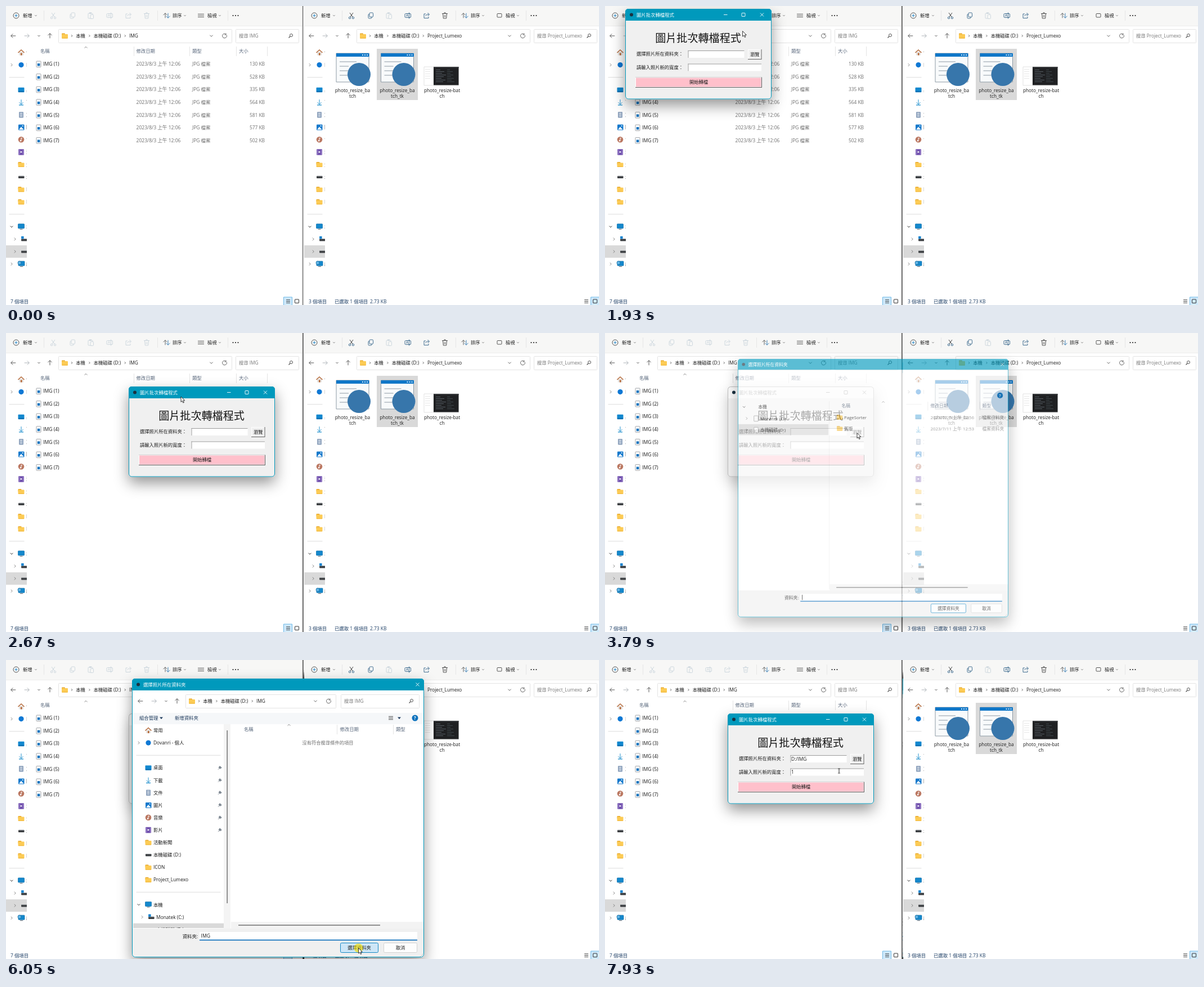
Recreate the animation shown at these times as an HTML page with a canvas. Size 1054 by 531 pixels, loop 8000 ms.

```html
<!DOCTYPE html>
<html lang="zh-Hant">
<head>
<meta charset="utf-8">
<title>Batch resize demo</title>
<style>
html, body { margin: 0; width: 100%; height: 100%; overflow: hidden; background: #fff; }
canvas { display: block; width: 100vw; height: 100vh; }
</style>
</head>
<body>
<canvas id="stage"></canvas>
<script>
const W = 1054, H = 531, LOOP = 8000, TICK = 1000 / 15;
const K = Math.max(1, window.devicePixelRatio || 1);
const FONT = '"Open Sans","Noto Sans CJK TC","Noto Sans CJK JP","Noto Sans",sans-serif';
const TEAL = '#0099bc', BLUE = '#0a79c4', INK = '#1c1c1c', GREY = '#6f6f6f', HEAD = '#56657a';
const SIDE = [
  ['home', '常用'], ['cloud', 'Dovanri - 個人', 'r'], 0,
  ['desk', '桌面'], ['down', '下載'], ['doc', '文件'], ['pic', '圖片'], ['music', '音樂'], ['video', '影片'],
  ['folder', '活動新聞'], ['drive', '本機磁碟 (D:)'], ['folder', 'ICON'], ['folder', 'Project_Lumexo'], 0,
  ['pc', '本機', 'd'], ['sys', 'Monatek (C:)', 'r', 6], ['drive', '本機磁碟 (D:)', 'r', 6], ['net', '網路', 'r']
];
const SIZES = [130, 528, 335, 564, 581, 577, 502];

function surface(el) {
  el.width = Math.round(W * K);
  el.height = Math.round(H * K);
  return el.getContext('2d');
}
const main = surface(document.getElementById('stage'));
const spare = surface(document.createElement('canvas'));
let c = main;

const clamp = (v, a = 0, b = 1) => Math.min(b, Math.max(a, v));
const smooth = p => p * p * (3 - 2 * p);

function text(s, x, y, color = INK, size = 8.4, align = 'left', weight = 400) {
  c.font = `${weight} ${size}px ${FONT}`;
  c.textAlign = align;
  c.fillStyle = color;
  c.fillText(s, x, y + size * .37);
  return c.measureText(s).width;
}
function rect(x, y, w, h, color) {
  c.fillStyle = color;
  c.fillRect(x, y, w, h);
}
function box(x, y, w, h, fill, stroke, r = 2, lw = 1) {
  c.beginPath();
  c.roundRect(x, y, w, h, r);
  if (fill) { c.fillStyle = fill; c.fill(); }
  if (stroke) { c.strokeStyle = stroke; c.lineWidth = lw; c.stroke(); }
}
function line(pts, color = '#333', lw = .9) {
  c.beginPath();
  for (let i = 0; i < pts.length; i += 2) c.lineTo(pts[i], pts[i + 1]);
  c.strokeStyle = color;
  c.lineWidth = lw;
  c.stroke();
}
function shape(pts, color) {
  c.beginPath();
  for (let i = 0; i < pts.length; i += 2) c.lineTo(pts[i], pts[i + 1]);
  c.fillStyle = color;
  c.fill();
}
function disc(x, y, r, fill, stroke, lw = .9) {
  c.beginPath();
  c.arc(x, y, r, 0, 7);
  if (fill) { c.fillStyle = fill; c.fill(); }
  if (stroke) { c.strokeStyle = stroke; c.lineWidth = lw; c.stroke(); }
}
function chevron(x, y, dir, color = '#555', s = 2) {
  if (dir === 'r') line([x - s / 2, y - s, x + s / 2, y, x - s / 2, y + s], color);
  else {
    const k = dir === 'd' ? 1 : -1;
    line([x - s, y - k * s / 2, x, y + k * s / 2, x + s, y - k * s / 2], color);
  }
}
function arrow(x, y, dx, dy, color) {
  const s = 4.3, a = x + dx * s, b = y + dy * s;
  line([x - dx * s, y - dy * s, a, b], color);
  line([a - dx * 3.5 + dy * 3.5, b - dy * 3.5 + dx * 3.5, a, b, a - dx * 3.5 - dy * 3.5, b - dy * 3.5 - dx * 3.5], color);
}
function bars(x, y, w, color = '#444') {
  for (let i = -1; i < 2; i++) line([x - w / 2, y + i * 2.7, x + w / 2, y + i * 2.7], color, .9);
}
function clipped(x, y, w, h, fn, r = 0) {
  c.save();
  c.beginPath();
  c.roundRect(x, y, w, h, r);
  c.clip();
  fn();
  c.restore();
}

const icons = {
  home(x, y) {
    rect(x - 4, y - 1, 8, 6, '#e4e0dc');
    rect(x - 1, y + 1, 2.4, 4, '#b3622f');
    line([x - 5.5, y + .5, x, y - 4.5, x + 5.5, y + .5], '#b56b3c', 1.5);
  },
  cloud(x, y) { disc(x, y, 4.6, '#0f78d4'); },
  desk(x, y) { box(x - 5.5, y - 4, 11, 8.5, '#1288cf', 0, 1); rect(x - 5, y + 2.5, 10, 1.5, '#0a66a8'); },
  down(x, y) { arrow(x, y - .5, 0, 1, '#0d86c9'); line([x - 4, y + 5, x + 4, y + 5], '#0d86c9', 1.2); },
  doc(x, y) {
    box(x - 4, y - 5, 8, 10.5, '#8fa3bd', 0, 1);
    for (const d of [-2.5, 0, 2.5]) line([x - 2.2, y + d, x + 2.2, y + d], '#eef3f9', 1);
  },
  pic(x, y) {
    box(x - 5, y - 4.5, 10.5, 10, '#1479cc', 0, 1);
    shape([x - 4, y + 4.5, x, y - .5, x + 4.5, y + 4.5], '#fff');
    disc(x + 2.6, y - 2, 1, '#fff');
  },
  music(x, y) {
    disc(x, y, 5.3, '#bb7862');
    line([x, y + 2, x, y - 3, x + 2, y - 2], '#fff', 1);
    disc(x - 1, y + 2, 1.2, '#fff');
  },
  video(x, y) {
    box(x - 5, y - 5, 10, 10.5, '#7050ad', 0, 1);
    line([x - 3.7, y - 4, x - 3.7, y + 5], '#c6b4e6', .8);
    line([x + 3.7, y - 4, x + 3.7, y + 5], '#c6b4e6', .8);
    shape([x - 1.3, y - 2, x + 2, y, x - 1.3, y + 2], '#fff');
  },
  folder(x, y) {
    box(x - 5.5, y - 4.5, 6, 5, '#e8a92c', 0, 1);
    box(x - 5.5, y - 3, 11, 7.7, '#fccb55', 0, 1);
    rect(x - 5, y + 3.5, 10, 1, '#f0b63a');
  },
  drive(x, y) { box(x - 5, y - 1.5, 10.5, 4, '#3c3f42', 0, .8); rect(x - 4.5, y - 2, 9.5, 1, '#a2a6a9'); },
  sys(x, y) { icons.drive(x, y + 1); rect(x - 5, y - 5, 4.5, 4.5, '#1583cf'); },
  pc(x, y) {
    box(x - 5.5, y - 5, 11, 8, '#1488cc', '#0a6ba8', .8, .7);
    rect(x - 2.5, y + 4, 5, 1, '#5a6570');
  },
  net(x, y) { icons.pc(x + .5, y); disc(x - 3, y - 2, 3, '#62b6e8', '#1b6c9f', .8); }
};

function sidebar(ox, oy, right, full) {
  SIDE.forEach((it, i) => {
    const y = oy + i * 22.1;
    if (!it) return rect(ox + 5.5, y - .5, full ? 150 : 27, 1, '#dcdcdc');
    const [kind, label, dir, indent = 0] = it;
    if (i === 16) rect(ox, y - 11, right - ox, 22, '#d9d9d9');
    if (dir) chevron(ox + 10 + indent, y, dir, dir === 'd' ? '#222' : '#777', 2.4);
    icons[kind](ox + 27 + indent * .85, y);
    text(label, ox + 36 + indent * .85, y);
    if (full && i > 2 && i < 9) {
      shape([ox + 154, y - 3.5, ox + 158, y + .5, ox + 156, y + 1, ox + 154.5, y + 2.5, ox + 151.5, y - .5, ox + 153, y - 2], '#7d8791');
      line([ox + 153, y + 1, ox + 151, y + 3.3], '#7d8791');
    }
  });
}

function address(ox, y, w, crumbs, find, gap, findW, canBack = true) {
  const soft = '#a5abb2', dark = '#444', bx = ox + 93;
  arrow(ox + 13, y, -1, 0, canBack ? dark : soft);
  arrow(ox + 37, y, 1, 0, soft);
  chevron(ox + 58.5, y, 'd', canBack ? '#444' : '#888');
  arrow(ox + 78, y, 0, -1, dark);
  box(bx + .5, y - 11.5, w - 1, 24, '#fff', '#e3e3e3', 1);
  icons.folder(ox + 104.5, y);
  let x = ox + 117;
  for (const s of crumbs) {
    chevron(x, y, 'r', '#555', 1.8);
    if (s) x += 7.3 + text(s, x + 7.3, y, INK, 8.3) + 7.5;
  }
  chevron(bx + w - 37, y, 'd', '#555', 2.6);
  c.beginPath();
  c.arc(bx + w - 13.5, y, 3.8, -.4, 5.2);
  c.strokeStyle = '#555';
  c.lineWidth = .9;
  c.stroke();
  line([bx + w - 11, y - 4.5, bx + w - 11, y - 2, bx + w - 13.5, y - 2], '#555');
  const fx = bx + w + gap;
  box(fx + .5, y - 11.5, findW - 1, 24, '#fff', '#e3e3e3', 1);
  text('搜尋 ' + find, fx + 6, y, '#777', 8.3);
  disc(fx + findW - 14, y - 1, 2.5, 0, '#444');
  line([fx + findW - 16, y + 1, fx + findW - 18.5, y + 3.5], '#444', 1.1);
}

function toolbar(ox, live) {
  const y = 17, on = live ? '#2d5f86' : '#c9d4dc', off = '#c9d4dc';
  rect(ox, 0, 528, 35, '#f7f7f6');
  rect(ox, 35, 528, 1, '#ececec');
  disc(ox + 18, y, 5, 0, '#444');
  line([ox + 15.5, y, ox + 20.5, y], BLUE);
  line([ox + 18, y - 2.5, ox + 18, y + 2.5], BLUE);
  text('新增', ox + 30, y);
  for (const [x, d] of [[53, 1], [318, 1], [380, 1]]) chevron(ox + x, y, 'd', '#777', 1.7);
  for (const x of [67, 269, 394]) rect(ox + x, 8, 1, 18, '#e6e6e6');
  const x = ox + 84;
  line([x - 3, y - 5, x + 2.5, y + 3], live ? '#333' : off);
  line([x + 3, y - 5, x - 2.5, y + 3], live ? '#333' : off);
  disc(x - 3, y + 4, 1.7, 0, on);
  disc(x + 3, y + 4, 1.7, 0, on);
  box(x + 30, y - 2.5, 6, 7.5, 0, on, 1.3, .9);
  box(x + 32, y - 5, 6.5, 7.5, '#f7f7f6', on, 1.3, .9);
  box(x + 62, y - 4, 8, 9, 0, off, 1, .9);
  box(x + 66, y - 1.5, 5.5, 7, '#f7f7f6', off, 1, .9);
  rect(x + 64, y - 5.5, 4, 2, off);
  box(x + 95, y - 3.5, 10.5, 7, 0, on, 1.5, .9);
  text('A', x + 97, y, on, 6.5);
  line([x + 102.5, y - 5.5, x + 102.5, y + 5.5], on);
  line([x + 132, y - 3, x + 129, y - 3, x + 129, y + 4.5, x + 137, y + 4.5, x + 137, y + 2], on);
  line([x + 131.5, y + 1, x + 134, y - 2, x + 138, y - 2], on);
  line([x + 135.5, y - 5, x + 138.5, y - 2, x + 135.5, y + 1], on);
  const bin = live ? '#444' : off;
  line([x + 161, y - 3.5, x + 171, y - 3.5], bin);
  line([x + 162.5, y - 3.5, x + 163.3, y + 5, x + 168.7, y + 5, x + 169.5, y - 3.5], bin);
  line([x + 164.5, y - 4, x + 165, y - 5.2, x + 167, y - 5.2, x + 167.5, y - 4], bin);
  line([x + 165, y - 1, x + 165, y + 3], bin, .7);
  line([x + 167, y - 1, x + 167, y + 3], bin, .7);
  arrow(ox + 283, y, 0, -1, '#555');
  arrow(ox + 288, y, 0, 1, '#2d77b0');
  text('排序', ox + 296, y);
  if (live) box(ox + 343, y - 3.5, 8, 6.5, 0, '#444', 1, .9);
  else bars(ox + 346.5, y, 11, '#555');
  text('檢視', ox + 358, y);
  for (let i = 0; i < 3; i++) disc(ox + 403.5 + i * 4.5, y, 1.1, '#222');
}

function pane(ox, place, live) {
  rect(ox, 0, 528, H, '#fff');
  toolbar(ox, live);
  address(ox, 53, 309, ['本機', '本機磁碟 (D:)', place], place, 6, 113);
  clipped(ox, 67, 37, 440, () => sidebar(ox, 82.5, ox + 37));
  text(live ? '3 個項目' : '7 個項目', ox + 8, 524.5, '#1e3f66');
  const pick = ox + (live ? 509.5 : 493.5);
  box(pick, 517, 15, 16, '#cfe9fb', '#6fb9e6', 0);
  bars(ox + 501.5, 524.5, 7, '#333');
  box(ox + 513.5, 521, 7, 6.5, 0, '#333', .5, 1);
}

function header(cols, seps, y, caretX, caretY) {
  for (const [s, x] of cols) text(s, x, y, HEAD);
  for (const x of seps) rect(x, y - 8, 1, 17, '#e4e4e4');
  chevron(caretX, caretY, 'u', '#777', 2.4);
}

function leftPane() {
  pane(0, 'IMG', false);
  header([['名稱', 61], ['修改日期', 231.5], ['類型', 331], ['大小', 414]], [227, 326, 409, 464], 80, 142, 73.5);
  SIZES.forEach((kb, i) => {
    const y = 103 + i * 22.6;
    box(54, y - 5, 8, 10.5, '#fff', '#8b8f93', .8, .8);
    rect(55.8, y - 1, 4.6, 4.5, '#1774bd');
    text(`IMG (${i + 1})`, 66, y, INK, 8.6);
    text('2023/8/3 上午 12:06', 231.5, y, GREY, 8.55);
    text('JPG 檔案', 331, y, GREY, 8.4);
    text(kb + ' KB', 460, y, GREY, 8.4, 'right');
  });
}

function script(x) {
  box(x, 84, 58, 51, '#f8fafb', '#8d9aa5', 0, 1);
  rect(x, 84, 58.5, 6, '#0f77c8');
  for (const d of [46, 50, 54]) rect(x + d, 86, 2, 2, '#cfe6f8');
  [30, 16, 22, 16].forEach((w, i) => rect(x + 6, 98 + i * 8, w, 2, '#c3cad0'));
  disc(x + 40.5, 121.5, 20.5, '#3776ab');
}

function rightPane(blue) {
  pane(530, 'Project_Lumexo', true);
  rect(526.8, 0, 1.6, H, '#747474');
  text('已選取 1 個項目', 584, 524.5, '#1e3f66');
  text('2.73 KB', 647, 524.5, '#1e3f66');
  if (blue) box(659.5, 76.5, 72, 90, '#cce8ff', '#99d1ff', 0);
  else rect(659, 76, 73, 91, '#d9d9d9');
  script(587);
  script(666.5);
  box(743, 108, 61.5, 33, '#fff', '#e2e2e2', 0);
  rect(760, 108, 44.5, 32.5, '#1f2022');
  rect(760, 108, 44.5, 2, '#35373a');
  for (let i = 0; i < 8; i++) {
    rect(764, 113 + i * 3, 8 + i * 7 % 11, .7, '#6e7680');
    rect(784, 113 + i * 3, 5 + i * 5 % 9, .7, '#4d565e');
    if (i < 5) rect(745, 112 + i * 4, 9, .7, '#ddd');
  }
  [['photo_resize_ba', 'tch', 616], ['photo_resize_ba', 'tch_tk', 695.5], ['photo_resize-bat', 'ch', 775]].forEach(([a, b, x]) => {
    text(a, x, 149.5, INK, 8.25, 'center');
    text(b, x, 160, INK, 8.25, 'center');
  });
}

function frame(x, y, w, h, title, active, closeOnly, fill) {
  c.save();
  c.shadowColor = active ? 'rgba(0,0,0,.42)' : 'rgba(0,0,0,.22)';
  c.shadowBlur = 26 * K;
  c.shadowOffsetY = 11 * K;
  box(x, y, w, h, '#f0f0f0', 0, 5);
  c.restore();
  const ink = active ? '#fff' : '#999', m = y + 10.5;
  clipped(x, y, w, h, () => {
    rect(x, y, w, 21, active ? TEAL : '#fafafa');
    disc(x + 11, m, 3, '#1b3140');
    text(title, x + 20, m, ink);
    const cx = x + w - (closeOnly ? 11.5 : 17);
    line([cx - 3, m - 3, cx + 3, m + 3], ink);
    line([cx + 3, m - 3, cx - 3, m + 3], ink);
    if (!closeOnly) {
      line([x + 175, m, x + 181.5, m], ink);
      box(x + 207, m - 3, 6, 6, 0, ink, .5, .9);
    }
    fill();
  }, 5);
  box(x + .5, y + .5, w - 1, h - 1, 0, active ? TEAL : '#bdbdbd', 5);
}

function raised(x, y, w, h, fill, label) {
  rect(x, y, w, h, '#5f5f5f');
  rect(x, y, w - 1, h - 1, '#fff');
  rect(x + 1, y + 1, w - 2.5, h - 2.5, fill);
  text(label, x + w / 2, y + h / 2 - .5, INK, 8.3, 'center');
}
function entry(x, y, w, value, caret) {
  rect(x, y, w, 13, '#fff');
  rect(x, y, w, 1, '#9c9c9c');
  rect(x, y, 1, 13, '#9c9c9c');
  const end = text(value, x + 1.5, y + 6.7, INK, 8.4);
  if (caret) rect(x + 2.5 + end, y + 2, 1, 9, '#111');
}

function app(x, y, tick) {
  const active = tick < 56 || tick >= 92;
  frame(x, y, 260, 160.5, '圖片批次轉檔程式', active, false, () => {
    text('圖片批次轉檔程式', x + 129.5, y + 52, '#111', 19.1, 'center', 500);
    text('選擇照片所在資料夾：', x + 20, y + 80, INK, 8.3);
    text('請輸入照片新的寬度：', x + 20, y + 104, INK, 8.3);
    if (tick > 20) entry(x + 111.5, y + 74, 100, tick >= 97 ? 'D:/IMG' : '');
    raised(x + 218, y + 72, 24.5, 18, '#f0f0f0', '瀏覽');
    entry(x + 111.5, y + 97.5, 130.5, tick >= 119 ? '1' : '', tick >= 107 && tick < 117);
    raised(x + 18, y + 121.5, 225, 18.5, '#ffc0cb', '開始轉檔');
  });
}

function dialog(tick) {
  const loaded = tick >= 60, found = tick >= 78;
  frame(224, 33, 519, 495, '選擇照片所在資料夾', true, true, () => {
    rect(224, 54, 519, 423, '#fff');
    if (loaded) {
      const here = found ? ['IMG'] : ['活動新聞', ''];
      address(226, 73, 268, ['本機', '本機磁碟 (D:)', ...here], here[0], 8, 140, found);
      rect(224, 94, 519, 20, '#f5f7f9');
      text('組合管理', 237, 103, '#1e3a5c');
      shape([273, 101.5, 279, 101.5, 276, 105], '#1e3a5c');
      text('新增資料夾', 300, 103, '#1e3a5c');
      bars(684, 103, 8, '#333');
      shape([696, 101.5, 702, 101.5, 699, 105], '#1e3a5c');
      rect(387, 114, 12, 363, '#f4f4f4');
      rect(392.3, 125, 1.8, 307, '#858585');
      clipped(224, 114, 163, 362, () => sidebar(226, 125, 387, true));
    } else {
      rect(225, 158, 173, 21, '#d9d9d9');
      chevron(236, 125, 'd', '#222', 2.4);
      text('本機', 263, 125);
      ['Monatek (C:)', '本機磁碟 (D:)'].forEach((s, i) => {
        const y = 147 + i * 22;
        chevron(241, y, 'r', '#777', 2.4);
        box(255, y - 5, 8, 10.5, '#fff', '#888', .5, .8);
        text(s, 267, y);
      });
      rect(399, 114, 1, 360, '#eee');
    }
    disc(727, 103, 5.5, '#0b72bd');
    text('?', 727, 103, '#fff', 8, 'center', 700);
    header([['名稱', 423], ['修改日期', 593.5], ['類型', 693]], [588, 688], 123, 503, 115.5);
    if (found) text('沒有符合搜尋條件的項目', 572, 147, GREY, 8.3, 'center');
    else if (tick < 77) [['PageSorter', '2023/7/25 上午 02:56'], ['舊版', '2023/7/11 上午 12:53']].forEach(([s, d], i) => {
      const y = 145 + i * 21.5;
      icons.folder(419.5, y - .5);
      text(s, 428, y);
      text(d, 593.5, y, GREY, 8.55);
      text('檔案資料夾', 693, y, GREY, 8.3);
    });
    rect(400, 465, 343, 12, '#f3f3f3');
    rect(413, 470, 252, 1.8, '#858585');
    rect(224, 477, 519, 51, '#f0f0f0');
    text('資料夾:', 341, 491, INK, 8.4, 'right');
    rect(344, 483, 387, 15, '#fff');
    rect(344, 496.6, 387, 1.6, '#0067b8');
    const typed = tick >= 79 ? 'IMG' : 'D:\\IMG'.slice(0, clamp(tick - 64, 0, 6));
    const end = text(typed, 346.5, 490, INK, 8.6);
    if (tick < 83) rect(347 + end, 485, 1, 10, '#111');
    const hover = tick >= 86;
    box(594.5, 502.5, 67, 17, hover ? '#cde6f7' : '#fdfdfd', '#1387c4', 2);
    text('選擇資料夾', 628, 511, INK, 8.3, 'center');
    box(671.5, 502.5, 59, 17, '#fdfdfd', '#d2d2d2', 2);
    text('取消', 701, 511, INK, 8.3, 'center');
    for (let i = 0; i < 3; i++) rect(740 - i * 2, 522 + i * 2, 1, 1, '#aaa');
  });
}

// Draws a window scaled about a point and faded as one piece.
function zoom(alpha, s, px, py, fn) {
  if (alpha <= 0) return;
  if (alpha >= 1 && s === 1) return fn();
  spare.setTransform(1, 0, 0, 1, 0, 0);
  spare.clearRect(0, 0, W * K, H * K);
  spare.setTransform(K * s, 0, 0, K * s, K * px * (1 - s), K * py * (1 - s));
  c = spare;
  fn();
  c = main;
  c.globalAlpha = clamp(alpha);
  c.drawImage(spare.canvas, 0, 0, W, H);
  c.globalAlpha = 1;
}

function along(keys, t, ease = smooth) {
  if (t <= keys[0][0]) return keys[0].slice(1);
  for (let i = 1; i < keys.length; i++) {
    const [t0, x0, y0] = keys[i - 1], [t1, x1, y1] = keys[i];
    if (t <= t1) {
      const p = ease((t - t0) / (t1 - t0));
      return [x0 + (x1 - x0) * p, y0 + (y1 - y0) * p];
    }
  }
  return keys[keys.length - 1].slice(1);
}
const DRAG = [[32, 36, 5], [33, 46, 12], [35, 135, 76], [37, 192, 90], [40, 218, 95]];
const MOUSE = [[1, 894, 415], [10, 712, 132], [24, 712, 132], [31, 129, 23], [32, 129, 23]];
const MOUSE2 = [[43, 311, 113], [49, 448, 177.5], [59, 448, 177.5], [63, 508, 516], [64, 508, 516],
  [70, 523, 499.5], [82, 523, 499.5], [88, 626.5, 511.5], [96, 626.5, 511.5], [105, 416, 197]];
const PRESS = [[12, 13], [14, 15], [33, 40], [51, 53], [90, 92], [107, 109]];

function pointer(tick, wx, wy) {
  if (tick < 1) return;
  const [x, y] = tick < 33 ? along(MOUSE, tick) : tick < 43 ? [wx + 93, wy + 18] : along(MOUSE2, tick);
  if (PRESS.some(([a, b]) => tick >= a && tick < b)) disc(x, y, 8, 'rgba(238,222,10,.66)');
  if (tick >= 104) {
    line([x, y - 3.5, x, y + 3.5], '#222', 1);
    line([x - 2, y - 4, x + 2, y - 4], '#222', .8);
    line([x - 2, y + 4, x + 2, y + 4], '#222', .8);
    return;
  }
  c.beginPath();
  [0, 0, 0, 9.5, 2.2, 7.5, 3.8, 11, 5.4, 10.3, 3.9, 6.9, 6.8, 6.8].forEach((v, i, a) => {
    if (i % 2) c.lineTo(x + a[i - 1], y + v);
  });
  c.closePath();
  c.fillStyle = '#fff';
  c.fill();
  c.strokeStyle = '#222';
  c.lineWidth = .9;
  c.stroke();
}

function draw(tick) {
  c.setTransform(K, 0, 0, K, 0, 0);
  leftPane();
  rightPane(tick >= 9 && tick < 25);
  const [wx, wy] = along(DRAG, tick, p => p);
  if (tick >= 18) {
    const p = clamp((tick - 18) / 4);
    zoom((tick - 17) * .5, 1 - .08 * (1 - p) ** 2.4, 166, 85.5, () => app(wx, wy, tick));
  }
  if (tick >= 56 && tick < 94) {
    const p = clamp((tick - 55) / 5), out = Math.max(0, tick - 91);
    zoom(out ? 1 - out * .38 : (tick - 55) * .32, 1 - .15 * (1 - p) ** 1.4 - out * .03,
      out ? 483 : 388, out ? 280 : 211, () => dialog(tick));
  }
  pointer(tick, wx, wy);
}

const start = performance.now();
let last = -1;
function loop() {
  const t = (performance.now() - start) % LOOP;
  const tick = Math.min(119, Math.floor((t + 19) / TICK));
  if (tick !== last) draw(last = tick);
  requestAnimationFrame(loop);
}
loop();
</script>
</body>
</html>
```
